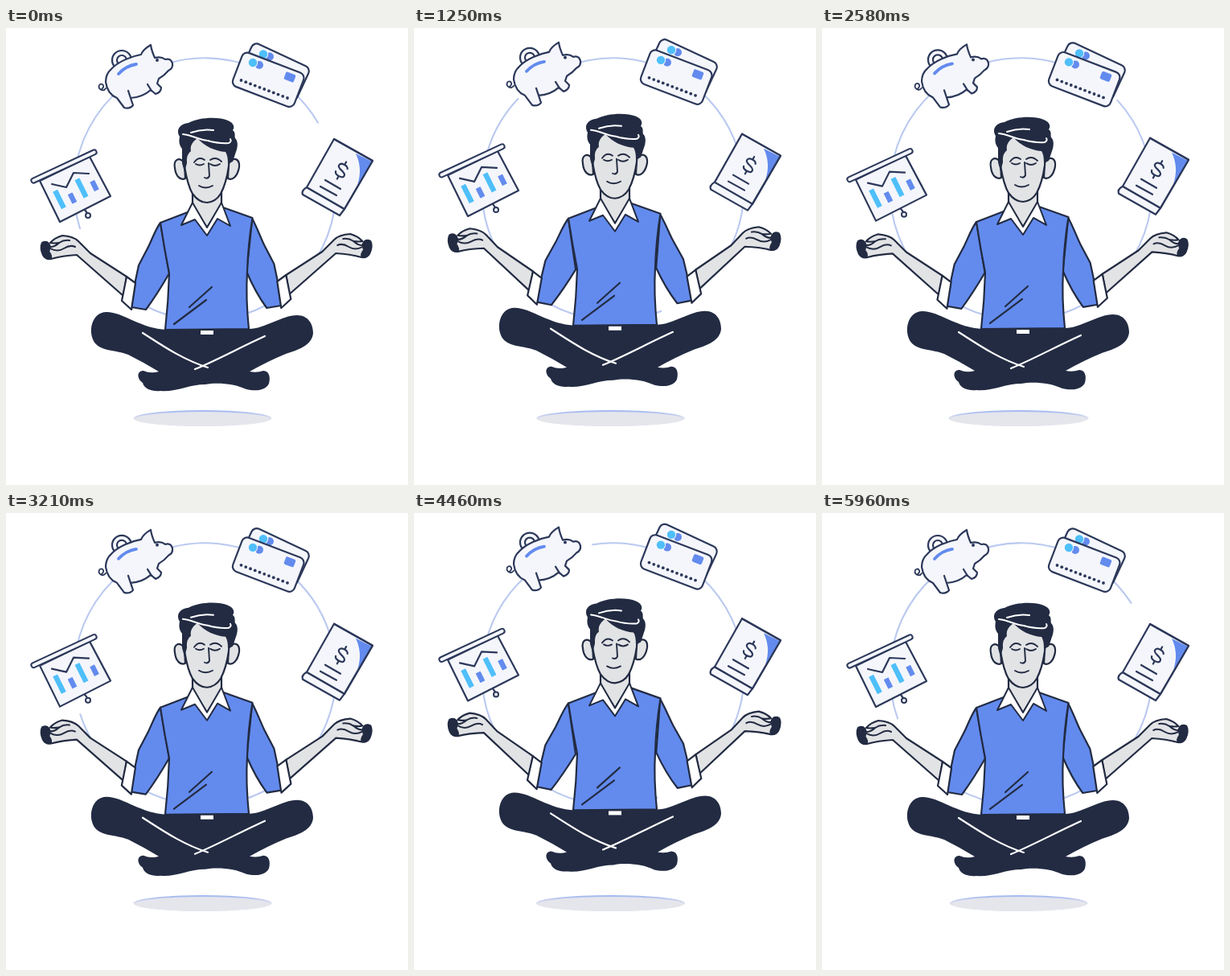
An HTML page with a canvas that plays this animation: 500 by 568 pixels, repeating every 6000 ms.

```html
<!DOCTYPE html>
<html lang="en">
<head>
<meta charset="utf-8">
<title>Calm finances</title>
<style>
html, body { margin: 0; width: 100%; height: 100%; overflow: hidden; background: #fff; }
canvas { display: block; width: 500px; height: 568px; }
</style>
</head>
<body>
<canvas id="stage"></canvas>
<script>
const LOOP = 6000, BOB = 3000;
const NAVY = '#222b42', EDGE = '#2c385a', BLUE = '#638bee', CYAN = '#4fbffa';
const SKIN = '#e2e3e5', PAPER = '#f4f6fb', WHITE = '#fff';

const canvas = document.getElementById('stage');
const dpr = window.devicePixelRatio || 1;
canvas.width = 500 * dpr;
canvas.height = 568 * dpr;
const c = canvas.getContext('2d');

function paint(p, fill, stroke, width = 2.2) {
  if (fill) { c.fillStyle = fill; c.fill(p); }
  if (stroke) { c.strokeStyle = stroke; c.lineWidth = width; c.stroke(p); }
}
const shape = (d, fill, stroke, width) => paint(new Path2D(d), fill, stroke, width);
const line = (d, color = NAVY, width = 2.2) => shape(d, null, color, width);

function dot(x, y, r, fill, stroke, width) {
  const p = new Path2D();
  p.arc(x, y, r, 0, Math.PI * 2);
  paint(p, fill, stroke, width);
}

function oval(x, y, rx, ry, fill) {
  const p = new Path2D();
  p.ellipse(x, y, rx, ry, 0, 0, Math.PI * 2);
  paint(p, fill);
}

function place(x, y, deg, draw) {
  c.save();
  c.translate(x, y);
  c.rotate(deg * Math.PI / 180);
  draw();
  c.restore();
}
const lift = (dy, draw) => place(0, -dy, 0, draw);

// rounded box centred on x, y and turned by deg
function box(x, y, w, h, deg, r, fill, stroke, width) {
  place(x, y, deg, () => {
    const p = new Path2D();
    p.roundRect(-w / 2, -h / 2, w, h, r);
    paint(p, fill, stroke, width);
  });
}

// ring with two unequal gaps, one turn per loop
function ring(t) {
  const turn = t / LOOP * 360;
  for (const [from, to] of [[162.5, 329.5], [353.4, 508.5]]) {
    const p = new Path2D();
    p.arc(247.5, 200.3, 163, (from + turn) * Math.PI / 180, (to + turn) * Math.PI / 180);
    paint(p, null, '#bac9f0', 2.1);
  }
}

function shadow(u) {
  const rx = 85.8 + 6.8 * u;
  const g = c.createLinearGradient(0, 475, 0, 487);
  g.addColorStop(0, '#9fb6f0');
  g.addColorStop(1, '#e5e5ec');
  oval(244.5, 485, rx, 10, g);
  oval(244.5, 486, rx - 2, 9, '#e5e5ec');
}

function pig() {
  dot(144, 40, 12, PAPER, EDGE);
  dot(144, 40, 6, WHITE, EDGE);
  line('M124 75C121 80 114 76 116 71C119 67 124 72 119 76', EDGE, 1.8);
  shape('M131 51C139 42 156 35 168 33Q170 27 180 21Q181 28 185 37Q193 35 198 39' +
    'Q205 37 207 44Q208 50 202 53Q197 59 190 63L188 69L193 74Q193 80 186 82L180 77' +
    'Q170 86 155 87L158 96Q154 101 147 99L138 87Q126 82 124 67Q124 57 131 51Z', PAPER, EDGE);
  line('M176 70L181 78', EDGE);
  line('M152 78L155 87', EDGE);
  line('M140 57Q149 47 162 45', BLUE, 3.8);
  dot(188, 40, 2, EDGE);
}

function disks(x, y) {
  dot(x + 8, y + 3, 5, BLUE);
  dot(x, y, 6.2, PAPER);
  dot(x, y, 5.2, CYAN);
}

function backCard() {
  box(334, 54.5, 78, 46, 25, 7, PAPER, EDGE);
  disks(320, 32.5);
}

function frontCard() {
  box(326.2, 64.3, 82, 45, 21, 7, PAPER, EDGE);
  disks(307, 43);
  box(353, 61, 13, 10, 21, 2, BLUE);
  for (let i = 0; i < 11; i++) dot(292.5 + 5.75 * i, 65 + 2.2 * i, 1.9, EDGE);
}

function book() {
  shape('M374 198Q367 202 369 207L415 233L421 225Z', PAPER, EDGE);
  shape('M408 138L456 165L421 225L374 198Z', PAPER, EDGE);
  shape('M435 156L455 166L437 195Q444 175 435 156Z', BLUE);
  line('M408 138L456 165L421 225', EDGE);
  place(417.5, 177, 28, () => {
    line('M5.5 -5C4 -9 -6 -9 -6 -4C-6 1 6 -1 6 4.5C6 9 -5 9 -6 4.5M0 -12V-8M0 8V12', EDGE);
  });
  line('M397 189L416 200M391 197L411 208', EDGE);
}

function board() {
  line('M98 226L101 230', EDGE);
  dot(102, 233, 3, PAPER, EDGE, 2);
  shape('M42 190L104 160L130 209L67 241Z', PAPER, EDGE);
  box(72, 172, 89, 6, -25, 3, PAPER, EDGE, 2);
  line('M57 194L75 198L84 180L103 181', EDGE);
  const bars = [[66.5, 213, 24, CYAN], [82.5, 211.5, 13, BLUE], [94, 199, 25, CYAN], [110, 196, 13, BLUE]];
  for (const [x, y, h, color] of bars) box(x, y, 6.5, h, -26.5, 0.5, color);
}

// left arm; the right one is its mirror image
function arm(top, pit) {
  shape('M150 309L105 280L90 265Q84 259 70 258Q60 261 55 267Q59 268 66 267Q61 272 55 272' +
    'Q52 263 45 267Q42 273 46 282Q49 288 56 287Q70 283 88 282L146 333Z', SKIN, NAVY);
  shape('M55 272Q52 263 45 267Q42 273 46 282Q49 288 56 287Q58 283 54 278Z', NAVY, NAVY, 1);
  line('M55 274Q64 279 72 274Q80 269 86 272M66 267Q72 263 79 264', NAVY, 2);
  shape(`M192 ${top}C186 250 181 264 177 272L165 295L161 314L156 347L174 350Q188 331 ${pit} 305Z`, BLUE, NAVY);
  shape('M150 309L161 317L156 350L144 339Z', WHITE, NAVY);
}

function arms(u) {
  const swing = (top, pit, dy) => {
    c.save();
    c.translate(192, 241 + dy);
    c.rotate(0.031 * u);
    c.translate(-192, -241);
    arm(top, pit);
    c.restore();
  };
  swing(242, 203, 0);
  c.save();
  c.translate(498.3, 0);
  c.scale(-1, 1);
  swing(239, 199, -2);
  c.restore();
}

function torso() {
  shape('M231 227L192 242Q197 275 203 305Q202 340 198 375L302 374Q298 335 300 303Q301 270 306.5 236L267 222Z', BLUE, NAVY);
  line('M228 347L256 322M209 368L249 338', NAVY);
  shape('M232 198V220L250 248L268 219V198Z', SKIN, NAVY);
  shape('M232 217L218 245L235 238L250 258L263 237L279 246L268 217L250 248Z', WHITE, NAVY, 2);
}

function legs() {
  shape('M125 353C146 353 168 374 200 375L302 374C322 374 343 357 362 357C376 357 382 368 382 379' +
    'C381 394 364 400 348 405Q326 414 303 427Q312 429 320 426C328 426 329 435 327 442' +
    'C322 452 308 451 299 449C285 442 262 440 248 443C228 443 210 453 192 451' +
    'C182 452 172 449 170 441C162 435 163 426 171 426Q180 430 190 427' +
    'Q172 416 152 406C136 400 120 402 111 392C101 379 106 353 125 353Z', NAVY);
  line('M170 379C192 393 219 412 251 422M235 424C260 414 293 396 322 383', WHITE, 2.2);
  c.fillStyle = WHITE;
  c.fillRect(242, 376, 16, 5);
}

function head() {
  shape('M222 168C215 159 208 164 210 174C211 184 217 190 223 187Z', SKIN, NAVY);
  shape('M277 168C284 159 291 163 290 173C288 184 282 190 276 187Z', SKIN, NAVY);
  shape('M222 136L222 172Q226 196 232 206Q240 217 250 217Q261 216 267 206Q274 193 277 172L279 136Z', SKIN, NAVY);
  shape('M219 168L219 150C215 145 215 140 216 135C211 127 216 119 227 118C240 111 264 110 276 115' +
    'C283 118 285 123 282 127C286 130 284 134 285 137C289 141 288 147 287 151L282 166L276 169' +
    'Q276 158 273 154C260 153 247 147 238 137C231 142 229 147 230 153Q224 157 225 168L222 179Z', NAVY);
  line('M220 132C232 133 239 139 251 140Q265 144 277 143Q281 141 279 138M230 130Q244 125 258 127', WHITE, 2);
  line('M234 167Q240 159 247 164M254 164Q261 159 268 166', NAVY, 1.9);
  line('M236 169Q241 172 246 169M254 169Q260 173 266 169', NAVY, 1.9);
  line('M252 168L253 184Q251 188 247 186', NAVY, 1.9);
  line('M240 196Q248 201 257 196', NAVY, 1.9);
}

function render(t) {
  const u = (1 - Math.cos(t / BOB * Math.PI * 2)) / 2;
  c.setTransform(dpr, 0, 0, dpr, 0, 0);
  c.fillStyle = WHITE;
  c.fillRect(0, 0, 500, 568);
  c.lineJoin = c.lineCap = 'round';
  ring(t);
  shadow(u);
  lift(3.4 * u, pig);
  lift(5.6 * u, backCard);
  lift(3.4 * u, frontCard);
  lift(6.8 * u, book);
  lift(7.6 * u, board);
  lift(5.6 * u, () => {
    arms(u);
    torso();
    head();
    legs();
  });
}

const start = performance.now();
function tick() {
  render((performance.now() - start) % LOOP);
  requestAnimationFrame(tick);
}
tick();
</script>
</body>
</html>
```
